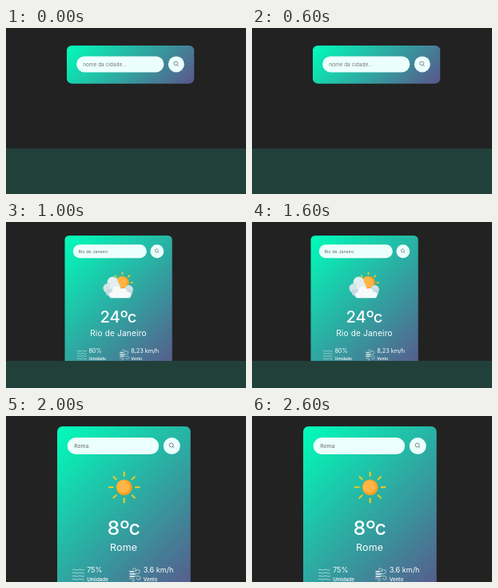
An HTML page that plays this animation: 300x208 px, repeating every 3000 ms.

```html
<!DOCTYPE html>
<html lang="pt">
<head>
<meta charset="utf-8">
<style>
html, body { margin: 0; width: 100%; height: 100%; overflow: hidden; background: #222; }
svg { display: block; width: 300px; height: 208px; font-family: Inter, "Open Sans", sans-serif; }
</style>
</head>
<body>
<svg id="stage" viewBox="0 0 300 208"></svg>
<script>
const stage = document.getElementById('stage');
const CARD_WIDTH = 167;

const text = (x, y, size, content, attrs = '') =>
  `<text x="${x}" y="${y}" font-size="${size}" fill="#fff" ${attrs}>${content}</text>`;

const disc = (x, y, r, color) => `<circle cx="${x}" cy="${y}" r="${r}" fill="${color}"/>`;

const sun = (x, y, r, inner, outer) => Array.from({ length: 8 }, (_, i) =>
  `<path d="M${inner} 0H${outer}" transform="translate(${x} ${y}) rotate(${i * 45})"
    stroke="#fcca1c" stroke-width="2" stroke-linecap="round"/>`).join('') +
  disc(x, y, r, '#f8a01f') + disc(x - r * .12, y - r * .08, r * .82, '#ffb545');

const sunny = sun(83.8, 76.5, 10, 14.2, 18.8);

const cloudy = sun(89.5, 73.5, 10.5, 13.2, 16) +
  disc(74.5, 72.5, 8.3, '#e3eef0') +
  disc(67.5, 82, 7.8, '#d3e4e8') + disc(78, 80, 8, '#e3eef0') +
  disc(99.5, 84, 6.8, '#cfe1e6') +
  '<rect x="64" y="83" width="41" height="11" rx="5" fill="#c6dbe1"/>' +
  disc(81, 86.5, 7.5, '#f6fafb') + disc(91, 88.5, 6.5, '#f6fafb') +
  '<rect x="69" y="88.5" width="34" height="9" rx="4.5" fill="#f6fafb"/>';

const humidityIcon = [180, 184, 188, 192].map(y =>
  `<path d="M19 ${y}q1.8-1 3.7 0t3.7 0t3.7 0t3.7 0"/>`).join('');
const windIcon = `
  <path d="M-18 182h6.5a2 2 0 1 0-2-2M-18 185h11a2.6 2.6 0 1 0-2.6-2.6M-18 188h12a2.3 2.3 0 1 1-2.3 2.3M-18 191h5a1.5 1.5 0 1 1-1.5 1.5"/>
  <path d="M-17 182.5h5M-17 185.5h7M-17 188.5h6" stroke-width="1.6"/>`;

const search = (query, color) => `
  <g fill="#ebfffc">
    <rect x="12.7" y="14.1" width="114.6" height="21" rx="10.5"/>
    <circle cx="143.5" cy="24.6" r="10.5"/>
  </g>
  <g fill="none" stroke="#667" stroke-width=".8">
    <path d="M144.6 25.4l1.8 1.8"/>
    <circle cx="142.9" cy="23.5" r="2.5"/>
  </g>
  <text x="21.2" y="27.2" font-size="6.8" fill="${color}">${query}</text>`;

const report = ({ icon, temp, city, humidity, wind, windX }) => icon +
  text(83.3, 136, 25, temp + 'ºc', 'text-anchor="middle" font-weight="500"') +
  text(83.3, 156.2, 12.4, city, 'text-anchor="middle" letter-spacing=".3"') +
  `<g fill="none" stroke="#fff" stroke-opacity=".7" stroke-width=".8">
    ${humidityIcon}<g transform="translate(${windX})">${windIcon}</g>
  </g>` +
  text(37.2, 183.5, 9, humidity) + text(37.2, 194, 6.3, 'Umidade', 'font-weight="500"') +
  text(windX, 183.5, 9.1, wind + ' km/h') + text(windX, 194, 6.3, 'Vento', 'font-weight="500"');

const scenes = [
  { x: 76, y: 22, width: 159.2, height: 50, query: 'nome da cidade...', ink: '#777', barTop: 151 },
  { x: 73.5, y: 17, width: 134.2, height: 217, query: 'Rio de Janeiro', ink: '#666', barTop: 174,
    weather: { icon: cloudy, temp: 24, city: 'Rio de Janeiro', humidity: '80%', wind: '8,23', windX: 103 } },
  { x: 64, y: 13, width: 166.7, height: 217, query: 'Roma', ink: '#666', barTop: 208,
    weather: { icon: sunny, temp: 8, city: 'Rome', humidity: '75%', wind: '3.6', windX: 108 } }
];

function render({ x, y, width, height, query, ink, barTop, weather }) {
  // Diagonal gradient whose ends meet the card corners, like a CSS 135deg gradient.
  const reach = (CARD_WIDTH + height) / 4, cx = CARD_WIDTH / 2, cy = height / 2;
  return `
    <linearGradient id="fade" gradientUnits="userSpaceOnUse"
      x1="${cx - reach}" y1="${cy - reach}" x2="${cx + reach}" y2="${cy + reach}">
      <stop stop-color="#00feba"/><stop offset="1" stop-color="#5b548a"/>
    </linearGradient>
    <rect width="300" height="208" fill="#222"/>
    <g transform="translate(${x} ${y}) scale(${width / CARD_WIDTH})">
      <rect width="${CARD_WIDTH}" height="${height}" rx="6.5" fill="url(#fade)"/>
      ${search(query, ink)}${weather ? report(weather) : ''}
    </g>
    <rect y="${barTop}" width="300" height="${208 - barTop}" fill="#22403a"/>`;
}

let shown = -1;
function tick() {
  const current = Math.floor(performance.now() / 1000) % scenes.length;
  if (current !== shown) stage.innerHTML = render(scenes[shown = current]);
  requestAnimationFrame(tick);
}
tick();
</script>
</body>
</html>
```
